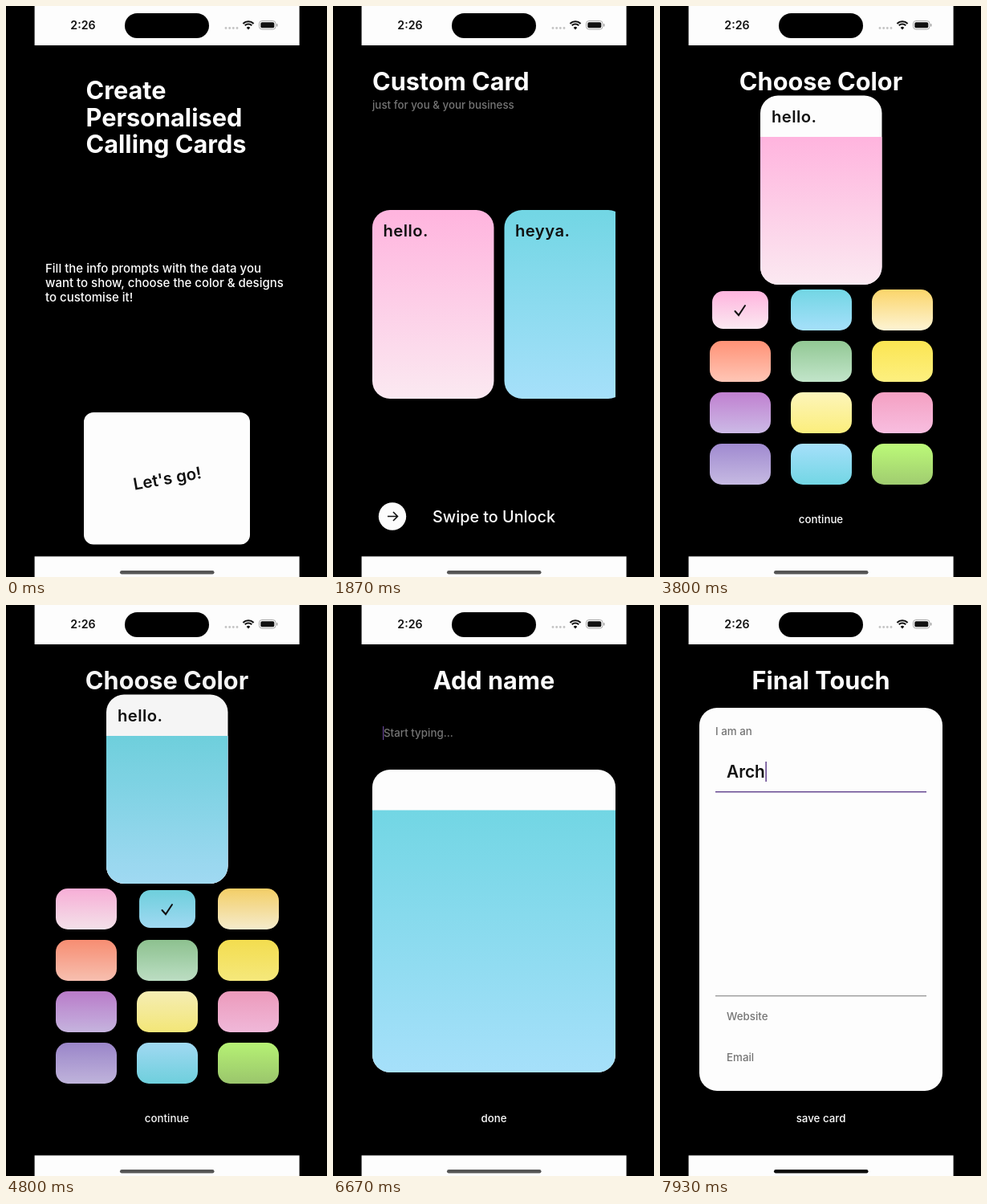
These frames come from a looping animation (400x711 px, 8000 ms). An HTML page:

```html
<!DOCTYPE html>
<html lang="en">
<head>
<meta charset="utf-8">
<title>Card maker</title>
<style>
html, body { margin: 0; width: 100%; height: 100%; overflow: hidden; background: #000; }
svg { display: block; width: 100%; height: 100%; font-family: Inter, Roboto, sans-serif; }
</style>
</head>
<body>
<svg id="stage" viewBox="0 0 400 711"></svg>
<script>
const LOOP = 8000;
const PAPER = '#fdfdfd', INK = '#111', TEXT = '#fdfdfd', DIM = '#757575';
const PURPLE = '#5f3f8c';

const gradients = {
  pink: ['#ffb4de', '#fbe9f1'],
  blue: ['#72d6e4', '#a6e0fa'],
  s0: ['#ffb4de', '#fbe9f1'], s1: ['#72d6e4', '#a6e0fa'], s2: ['#fbd56a', '#fdf4d4'],
  s3: ['#ff9276', '#ffc6b6'], s4: ['#92c894', '#c2e5ca'], s5: ['#fbe552', '#fdf080'],
  s6: ['#c080d0', '#ccbae6'], s7: ['#fdf5ba', '#fbee7c'], s8: ['#f4a0c2', '#f8bee0'],
  s9: ['#a08ad0', '#c6bae2'], s10: ['#a6e0fa', '#72d6e4'], s11: ['#bcfa78', '#a0cc70']
};

const defs = Object.entries(gradients).map(([id, [top, bottom]]) =>
  `<linearGradient id="${id}" x2="0" y2="1"><stop stop-color="${top}"/><stop offset="1" stop-color="${bottom}"/></linearGradient>`
).join('');

const text = (s, x, y, size, weight, fill, more = '') =>
  `<text x="${x}" y="${y}" font-size="${size}" font-weight="${weight}" fill="${fill}" ${more}>${s}</text>`;
const mid = 'text-anchor="middle"';
const title = (s, x, y, more) => text(s, x, y, 30.7, 700, TEXT, more);
const small = (s, x, y) => text(s, x, y, 13.35, 450, DIM);
const greet = (s, x, y) => text(s, x, y, 20.3, 600, INK, 'letter-spacing=".42"');
const rect = (x, y, w, h, r, fill, more = '') =>
  `<rect x="${x}" y="${y}" width="${w}" height="${h}" rx="${r}" fill="${fill}" ${more}/>`;
const foot = s => text(s, 200.5, 644, 13.3, 500, TEXT, mid);
const group = (id, body, more = '') => `<g id="${id}" ${more}>${body}</g>`;

// Colour field below a white header, with rounded lower corners
const lower = (x, y, w, h, r, fill, id = '') =>
  `<path ${id && `id="${id}"`} fill="url(#${fill})" d="M${x} ${y}h${w}v${h - r}a${r} ${r} 0 0 1 ${-r} ${r}h${2 * r - w}a${r} ${r} 0 0 1 ${-r} ${-r}z"/>`;

const intro =
  ['Create', 'Personalised', 'Calling Cards'].map((s, i) => title(s, 99.5, 116 + i * 33.6)).join('') +
  ['Fill the info prompts with the data you', 'want to show, choose the color &amp; designs', 'to customise it!']
    .map((s, i) => text(s, 49, 332 + i * 17.9, 15, 450, TEXT)).join('') +
  group('go', rect(97, 506, 207, 164.5, 12, PAPER) +
    text("Let's go!", 201, 595.5, 20.5, 600, INK, mid + ' transform="rotate(-10 201 588)"'));

const card = (x, fill, word) =>
  rect(x, 254, 151.5, 235, 22, `url(#${fill})`) + greet(word, x + 13.5, 286.5);
const custom =
  title('Custom Card', 49, 104.5) +
  small('just for you &amp; your business', 49, 128) +
  `<g clip-path="url(#view)">${group('cards', card(49, 'pink', 'hello.') + card(213.5, 'blue', 'heyya.'))}</g>` +
  rect(49, 612, 303, 47, 23.5, '#c4c4c4', 'id="track"') +
  text('Swipe to Unlock', 200.5, 643, 19.8, 500, TEXT, mid + ' id="swipe"') +
  group('knob', `<circle cx="74" cy="635.5" r="17.2" fill="${PAPER}"/>
    <path d="M68 635.5h12.5m-5.5-5.5l5.5 5.5l-5.5 5.5" fill="none" stroke="${INK}" stroke-width="1.6"/>`);

const swatch = i => {
  const x = 62 + (i % 3) * 101, y = 353 + Math.floor(i / 3) * 64;
  return group('sw' + i, rect(x, y, 76, 51, 15, `url(#s${i})`), `data-cx="${x + 38}" data-cy="${y + 25.5}"`);
};
const tick = (id, x) =>
  `<path id="${id}" d="M${x - 6.5} 380l4.5 5l8-12" fill="none" stroke="${INK}" stroke-width="2" stroke-linecap="round"/>`;
const choose =
  title('Choose Color', 200.5, 104.5, mid) +
  rect(125, 111.5, 151.5, 235.5, 22, PAPER) +
  lower(125, 163, 151.5, 184, 22, 'pink') + lower(125, 163, 151.5, 184, 22, 'blue', 'picked') +
  greet('hello.', 139, 144.5) +
  Array.from({ length: 12 }, (_, i) => swatch(i)).join('') +
  tick('tick0', 100) + tick('tick1', 201) + foot('continue');

const naming =
  title('Add name', 200.5, 104.5, mid) +
  small('Start typing...', 63, 164) +
  rect(62, 151, 1.3, 17, 0, PURPLE, 'id="caret"') +
  rect(49, 205, 303, 377, 22, PAPER) + lower(49, 255.5, 303, 326.5, 22, 'blue') + foot('done');

const final =
  title('Final Touch', 200.5, 104.5, mid) +
  rect(49, 128, 303, 477, 22, PAPER) +
  small('I am an', 69, 161.5) +
  text('', 83, 215, 20.8, 600, INK, 'id="role"') +
  rect(0, 195, 1.5, 25, 0, PURPLE, 'id="roleCaret"') +
  rect(69, 232, 263, 1.4, 0, DIM, 'id="line"') +
  rect(69, 486.3, 263, 1, 0, DIM) +
  small('Website', 83, 516.5) + small('Email', 83, 567.5) + foot('save card');

const arc = r => {
  const d = r * Math.SQRT1_2;
  return `<path d="M${302 - d} ${28.5 - d}A${r} ${r} 0 0 1 ${302 + d} ${28.5 - d}" fill="none" stroke="${INK}" stroke-width="2.1"/>`;
};
const chrome =
  rect(35.6, 0, 330, 49, 0, PAPER) + rect(35.6, 685.4, 330, 26, 0, PAPER) +
  rect(148, 9, 105, 31, 15.5, '#000') +
  text('2:26', 96, 29, 14.2, 600, INK, mid) +
  [274, 278.7, 283.3, 288].map(x => `<circle cx="${x}" cy="27.5" r="1.4" fill="#c4c4c4"/>`).join('') +
  arc(9.3) + arc(6) + `<path d="M302 29.5l-2.3-2.6a3.3 3.3 0 0 1 4.6 0z" fill="${INK}"/>` +
  rect(315.5, 18.5, 20.5, 10.5, 3.4, 'none', 'stroke="#a8a8a8"') +
  rect(317.3, 20.2, 17, 7.1, 1.9, INK) + rect(337, 22, 1.5, 3.6, 0.7, '#a8a8a8') +
  rect(142, 703, 117.5, 4.4, 2.2, '#000', 'id="bar"');

const stage = document.getElementById('stage');
stage.innerHTML = `<defs>${defs}<clipPath id="view"><rect x="49" y="200" width="303" height="340"/></clipPath></defs>` +
  Object.entries({ intro, custom, choose, naming, final }).map(([id, body]) => group(id, body)).join('') + chrome;

const $ = id => document.getElementById(id);
const ease = p => p < 0.5 ? 4 * p ** 3 : 1 - (2 - 2 * p) ** 3 / 2;
const out = p => 1 - (1 - p) ** 3;
const ramp = (t, a, b, f = ease) => f(Math.min(1, Math.max(0, (t - a) / (b - a))));
const fade = (id, v) => {
  $(id).setAttribute('opacity', v);
  $(id).style.display = v > 0 ? '' : 'none';
};
const scale = (el, s) => {
  const { cx, cy } = el.dataset;
  el.setAttribute('transform', `translate(${cx} ${cy}) scale(${s}) translate(${-cx} ${-cy})`);
};

// id, fade in from/to, fade out from/to
const pages = [
  ['intro', -2, -1, 640, 880],
  ['custom', 900, 1200, 2860, 3040],
  ['choose', 3040, 3330, 4760, 4960],
  ['naming', 4980, 5270, 6760, 7130],
  ['final', 7290, 7540, 8100, 8200]
];
const keys = [[7640, 'A'], [7720, 'r'], [7800, 'c'], [7880, 'h']];

function draw(t) {
  for (const [id, a, b, c, d] of pages) fade(id, ramp(t, a, b) * (1 - ramp(t, c, d)));

  $('cards').setAttribute('transform', `translate(${302 * (1 - ramp(t, 1325, 1730))} 0)`);

  const p = ramp(t, 2340, 2860);
  $('knob').setAttribute('transform', `translate(${252 * p} 0)`);
  fade('track', Math.min(1, p * 2));
  fade('swipe', Math.max(0, 1 - p * 2.2));

  const pick = ramp(t, 4080, 4280, out);
  fade('picked', pick);
  fade('tick0', 1 - pick);
  fade('tick1', pick);
  scale($('sw0'), 0.92 + 0.08 * pick);
  scale($('sw1'), 1 - 0.08 * pick);

  fade('caret', t > 5850 && t < 6700 && (t - 5850) % 340 < 200 ? 1 : 0);

  const role = $('role'), focus = t >= 7580;
  role.textContent = keys.filter(k => t >= k[0]).map(k => k[1]).join('');
  $('roleCaret').setAttribute('x', 83.6 + (role.textContent ? role.getComputedTextLength() : 0));
  fade('roleCaret', focus ? 1 : 0);
  $('line').setAttribute('fill', focus ? PURPLE : DIM);
  $('bar').setAttribute('fill', t < 6700 ? '#555' : '#0a0a0a');
}

let start;
function loop(now) {
  start ??= now;
  draw((now - start) % LOOP);
  requestAnimationFrame(loop);
}
draw(0);
requestAnimationFrame(loop);
</script>
</body>
</html>
```
